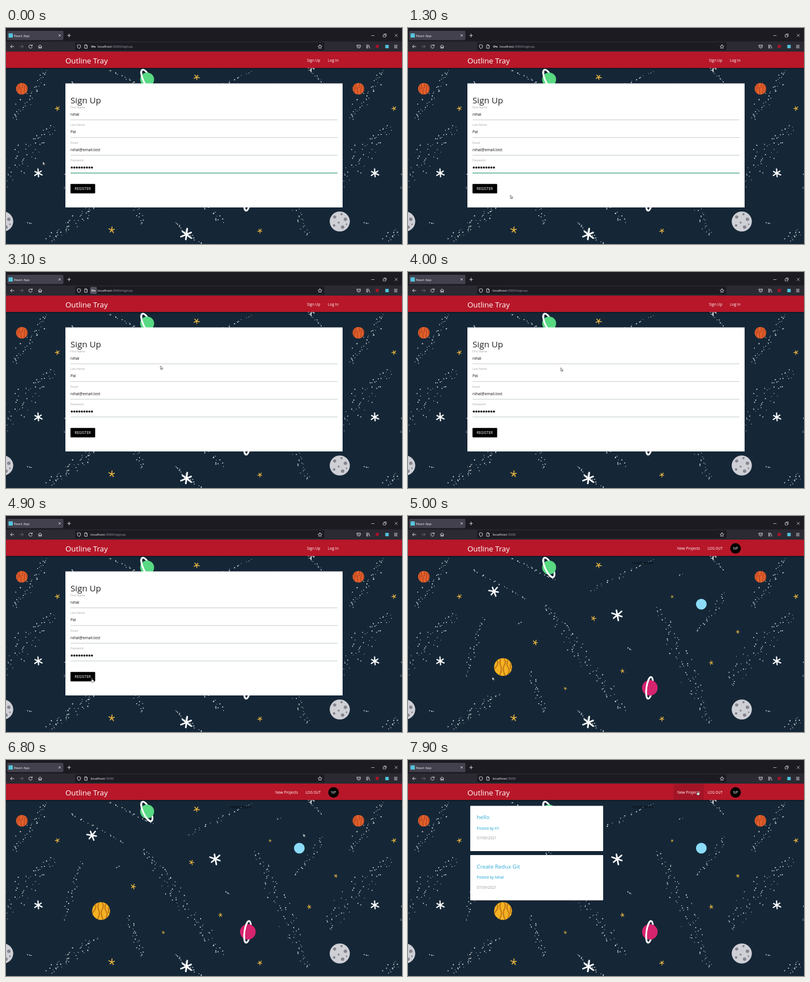
Recreate the animation shown at these times as an HTML page. Size 700 by 384 pixels, loop 8000 ms.

```html
<!DOCTYPE html>
<html lang="en">
<head>
<meta charset="utf-8">
<title>React App</title>
<style>
html, body { margin: 0; width: 100%; height: 100%; overflow: hidden; background: #152737; }
svg { display: block; width: 100vw; height: 100vh; font-family: "Open Sans", "Noto Sans", sans-serif; }
.icon { fill: none; stroke: #e4e4ea; stroke-width: .9; stroke-linecap: round; stroke-linejoin: round; }
.nav { fill: #fff; font-size: 6.65px; }
.label { fill: #a3a3a3; font-size: 5.1px; }
.value { fill: #111; font-size: 6.8px; }
.rule { stroke: #a9b6b6; stroke-width: .7; }
.title { fill: #2ba9d5; font-size: 9.75px; }
.by { fill: #14a3cf; font-size: 6.6px; }
.date { fill: #999; font-size: 6.6px; }
.url { fill: #9b9aa5; font-size: 6.07px; }
.url tspan { fill: #fbfbfe; }

.signup, .home, .cards, .hover, .key, .lit, .focus, .shift, .arrow, .hand {
  animation: 8s step-end infinite;
}
.signup { animation-name: signup; }
.home { animation-name: home; }
.cards, .hover { animation-name: late; }
.key { animation-name: key; }
.lit { animation-name: lit; }
.focus { animation-name: focus; }
.shift { animation-name: shift; }
.arrow { animation-name: arrow; }
.hand { animation-name: hand; }
.pointer { animation: move 8s ease-in-out infinite; }

@keyframes signup { 0% { opacity: 1 } 62.5%, 100% { opacity: 0 } }
@keyframes home { 0% { opacity: 0 } 62.5%, 100% { opacity: 1 } }
@keyframes late { 0% { opacity: 0 } 95%, 100% { opacity: 1 } }
@keyframes key { 0% { opacity: 1 } 50%, 100% { opacity: 0 } }
@keyframes lit { 0% { opacity: 0 } 27.5% { opacity: 1 } 50%, 100% { opacity: 0 } }
@keyframes focus { 0% { opacity: 1 } 27.5%, 100% { opacity: 0 } }
@keyframes shift { 0% { transform: translateX(12.5px) } 50%, 100% { transform: none } }
@keyframes arrow { 0% { opacity: 1 } 58.75% { opacity: 0 } 62.5% { opacity: 1 } 95%, 100% { opacity: 0 } }
@keyframes hand { 0% { opacity: 0 } 58.75% { opacity: 1 } 62.5% { opacity: 0 } 95%, 100% { opacity: 1 } }
@keyframes move {
  0% { transform: translate(65px, 237.5px) }
  16.25% { transform: translate(181px, 297px) }
  27.5% { transform: translate(155px, 34px) }
  38.75%, 48.75% { transform: translate(273px, 167px) }
  60%, 62.4% { transform: translate(152px, 288px) }
  62.5% { transform: translate(149px, 286px) }
  81.25% { transform: translate(529px, 144px) }
  95% { transform: translate(506px, 59px) }
  98.75%, 100% { transform: translate(512px, 55px) }
}
</style>
</head>
<body>
<svg viewBox="0 0 700 384" preserveAspectRatio="none">
  <defs>
    <clipPath id="rust"><circle cx="28" cy="108" r="10.5"/></clipPath>
    <clipPath id="gold"><circle cx="168" cy="268.5" r="16"/></clipPath>
    <linearGradient id="shade" x2="0" y2="1">
      <stop stop-opacity=".4"/><stop offset="1" stop-opacity="0"/>
    </linearGradient>
    <g id="sky">
      <g id="dots" fill="#fff"></g>
      <g id="stars" stroke-linecap="round"></g>
      <g clip-path="url(#rust)">
        <circle cx="28" cy="108" r="10.5" fill="#e2602c"/>
        <path d="M20 100l1 16M24 97l-1 12M26 105l1 14M30 97l-1 10M33 101l-1 16M36 100l1 12" fill="none" stroke="#a83d1c" stroke-width="1.1"/>
      </g>
      <g fill="none" stroke="#fff" stroke-width="3">
        <ellipse cx="249" cy="91.5" rx="6.5" ry="19" transform="rotate(-25 249 91.5)"/>
        <circle cx="249.500" cy="91.500" r="12.3" fill="#58d982" stroke="none"/>
        <path d="M249 72.500a6.500 19 0 0 0 0 38" transform="rotate(-25 249 91.5)"/>
        <ellipse cx="427" cy="305.5" rx="5.5" ry="19.5" transform="rotate(8 427 305.5)"/>
        <circle cx="427.5" cy="305.5" r="13.8" fill="#d6246f" stroke="none"/>
        <path d="M427 286a5.500 19.500 0 0 0 0 39" transform="rotate(8 427 305.5)"/>
      </g>
      <circle cx="518.5" cy="156.700" r="9.5" fill="#8bdcf8"/>
      <g clip-path="url(#gold)">
        <circle cx="168" cy="268.5" r="16" fill="#f4b223"/>
        <path d="M157 255q4 8-2 14t3 14M164 253q-3 8 0 14t-2 16M170 253q4 7 0 13t2 18M177 255q-4 8 0 14t-1 13M182 260q-2 6 0 13" fill="none" stroke="#c57a14" stroke-width="2.2"/>
      </g>
      <circle cx="590" cy="344" r="17.8" fill="#cfcfd6"/>
      <g fill="#85858f">
        <circle cx="581" cy="336" r="2.8"/><circle cx="593" cy="331" r="2"/>
        <circle cx="600" cy="340" r="3"/><circle cx="588" cy="346" r="1.7"/>
        <circle cx="580" cy="351" r="2.200"/><circle cx="595" cy="354" r="3"/><circle cx="602" cy="349" r="1.4"/>
      </g>
    </g>
  </defs>

  <rect width="700" height="384" fill="#152737"/>
  <use href="#sky" x="-595"/>
  <use href="#sky"/>
  <use href="#sky" x="595"/>

  <!-- browser -->
  <rect width="700" height="25" fill="#1c1b22"/>
  <rect y="24" width="700" height="18" fill="#2b2a33"/>
  <rect x="2" y="5" width="99.500" height="16.500" rx="2" fill="#42414d"/>
  <rect x="4.5" y="9.5" width="7.5" height="7.5" fill="#57c4dc"/>
  <text x="14" y="16" font-size="5.9" fill="#f4f4f8">React App</text>
  <rect x="122" y="25.500" width="441" height="14.500" rx="2" fill="#1c1b22"/>
  <g class="icon">
    <path d="M93.300 11.700l3 3m0-3l-3 3M111.500 10.500v5.500m-2.700-2.700h5.400"/>
    <path d="M646 13.5h5M667 12h4v4h-4zM668.500 12v-1.500h3.700v3.700h-1M687.500 11l4.500 4.500m0-4.500l-4.500 4.500" stroke-width=".7"/>
    <path d="M14 33H8m2.600-2.600L8 33l2.600 2.600"/>
    <path d="M24.500 33h6m-2.600-2.600l2.600 2.600-2.600 2.600" stroke="#72717b"/>
    <path d="M46 31.500a3 3 0 1 0 .2 2.500M46.300 29.700v2.100h-2.100"/>
    <path d="M57 33l3.200-3 3.200 3M58 32.500V36h1.500v-2h1.500v2h1.500v-3.500"/>
    <path d="M129 29.800l2.800 1v2q-.2 2.700-2.800 3.800-2.600-1.100-2.800-3.800v-2z"/>
    <path d="M139.500 29.900h2.700l1.300 1.400v4.800h-4zM142 30v1.500h1.400"/>
    <path d="M555 29.700l1 2.200 2.500.3-1.800 1.700.4 2.400-2.100-1.200-2.100 1.200.4-2.400-1.800-1.700 2.500-.3z" stroke-width=".8"/>
    <path d="M620.500 30.500h6v2.200a3 3 0 0 1-6 0zM622 32.300l1.500 1.400 1.500-1.400"/>
    <path d="M637.500 30v6M639.500 30v6M641.200 30.500l2 5.500"/>
    <path d="M686.500 30.800h5M686.500 33h5M686.500 35.200h5"/>
  </g>
  <rect x="653.500" y="30" width="5.500" height="5.500" fill="#a3142a"/>
  <rect x="670.500" y="30" width="6" height="6" fill="#4fc3dc"/>
  <g class="key">
    <rect class="lit" x="149" y="26.500" width="11.500" height="12.500" rx="1.500" fill="#55545f"/>
    <path class="icon" d="M154 33h3.800v1.400M156.300 33v1.200"/>
    <circle class="icon" cx="152.500" cy="33" r="1.500"/>
  </g>

  <!-- header -->
  <rect y="71" width="700" height="3" fill="url(#shade)"/>
  <rect y="42" width="700" height="29" fill="#b71729"/>
  <text x="105" y="62.700" font-size="13.3" fill="#fff">Outline Tray</text>

  <g class="signup">
    <g class="shift"><text class="url" x="149.500" y="35.300"><tspan>localhost</tspan>:3000/signup</text></g>
    <text class="nav" x="532" y="59.700">Sign Up</text>
    <text class="nav" x="569" y="59.700">Log In</text>
    <rect x="105" y="98.500" width="490" height="220.500" fill="#fff"/>
    <text x="114" y="133.700" font-size="15.200" fill="#222">Sign Up</text>
    <text class="label" x="114" y="142.500">First Name</text>
    <text class="value" x="114" y="155.800">nihal</text>
    <path class="rule" d="M114 163.200h472"/>
    <text class="label" x="114" y="174">Last Name</text>
    <text class="value" x="114" y="187.200">Pal</text>
    <path class="rule" d="M114 194.700h472"/>
    <text class="label" x="114" y="205.500">Email</text>
    <text class="value" x="114" y="218.700">nihal@email.test</text>
    <path class="rule" d="M114 226.200h472"/>
    <text class="label" x="114" y="237">Password</text>
    <path d="M116.300 248h37" stroke="#111" stroke-width="3.700" stroke-linecap="round" stroke-dasharray="0 4.450"/>
    <path class="rule" d="M114 257.700h472"/>
    <path class="focus" d="M114 257.900h472" stroke="#48a982" stroke-width="1.100"/>
    <rect x="114" y="278" width="44" height="17" rx="1" opacity=".18"/>
    <rect x="114" y="277.300" width="43.500" height="16.500" rx="1"/>
    <text x="121.300" y="288" font-size="6.450" fill="#fff">REGISTER</text>
  </g>

  <g class="home">
    <text class="url" x="149.500" y="35.300"><tspan>localhost</tspan>:3000</text>
    <rect class="hover" x="469" y="42" width="54" height="29" opacity="0" fill="#a31526"/>
    <text class="nav" x="476" y="59.700">New Projects</text>
    <text class="nav" x="529.500" y="60" style="font-size:6.200px">LOG OUT</text>
    <circle cx="579" cy="57.700" r="9.400"/>
    <text x="579" y="59.900" font-size="6.300" fill="#fff" text-anchor="middle">NP</text>
    <text x="396" y="86.200" font-size="6.500" fill="#060c12">Notifications</text>
    <g class="cards">
      <path d="M110 82h235v81H110zM110 169.500h235v81H110z" opacity=".3"/>
      <rect x="110" y="81.500" width="235" height="80.500" rx="1" fill="#fff"/>
      <text class="title" x="121.500" y="105.300">hello</text>
      <text class="by" x="121.500" y="124.200">Posted by XY</text>
      <text class="date" x="121.500" y="141.200">07/06/2021</text>
      <rect x="110" y="169" width="235" height="80.500" rx="1" fill="#fff"/>
      <text class="title" x="121.500" y="192.800">Create Redux Git</text>
      <text class="by" x="121.500" y="211.300">Posted by Nihal</text>
      <text class="date" x="121.500" y="228.500">07/09/2021</text>
    </g>
  </g>

  <g class="pointer" fill="#fff" stroke="#222" stroke-width=".6" stroke-linejoin="round">
    <path class="arrow" d="M0 0v6l1.400-1.200 1 2 .9-.4-.9-2h1.900z"/>
    <path class="hand" d="M-.6.5q.6-.9 1.200 0V3l2.200.7q.7.300.6 1.100l-.6 2.600H-.6L-2.300 4.800q.2-1 1.100-.4l.6.500z"/>
  </g>
</svg>
<script>
let seed = 11;
const rnd = () => (seed = seed * 16807 % 2147483647) / 2147483647;
const $ = id => document.getElementById(id);

const dot = (x, y, r, alpha) =>
  `<circle cx="${x.toFixed(1)}" cy="${y.toFixed(1)}" r="${r.toFixed(2)}" opacity="${alpha}"/>`;

// a band of scattered dots: start, end, half width, count
const band = ([x1, y1, x2, y2, w, n]) => {
  let out = '';
  for (let i = 0; i < n; i++) {
    const t = (i + rnd()) / n;
    const off = (rnd() + rnd() - 1) * w * (.4 + Math.sin(t * Math.PI) * .8);
    out += dot(x1 + (x2 - x1) * t + off, y1 + (y2 - y1) * t + off * .2, .5 + rnd() * .55, .9);
  }
  return out;
};

const star = (x, y, r, arms, color) => {
  let d = '';
  for (let i = 0; i < arms; i++) {
    const a = i / arms * 2 * Math.PI + x;
    const len = r * (i % 2 ? .85 : 1);
    d += `M${x} ${y}l${(Math.cos(a) * len).toFixed(1)} ${(Math.sin(a) * len).toFixed(1)}`;
  }
  return `<path d="${d}" stroke="${color}" stroke-width="${r * .25 + .3}"/>`;
};

const bands = [
  [73, 76, 14, 163, 14, 42], [80, 173, -30, 300, 26, 75], [134, 180, 102, 286, 10, 30],
  [180, 74, 262, 114, 9, 22], [113, 94, 213, 150, 7, 20], [244, 158, 380, 346, 24, 92],
  [444, 163, 534, 370, 22, 88], [434, 76, 322, 134, 8, 24], [560, 135, 513, 207, 9, 24],
  [215, 276, 241, 350, 9, 26], [160, 316, 76, 378, 18, 48], [297, 344, 345, 384, 8, 20],
  [536, 74, 558, 96, 5, 10], [193, 192, 202, 188, 1, 3], [388, 234, 396, 239, 1, 4],
  [478, 106, 487, 103, 1, 3], [38, 346, 47, 348, 1, 3]
];
let dots = bands.map(band).join('');
for (let i = 0; i < 130; i++) dots += dot(rnd() * 595, 72 + rnd() * 312, .4, .22);
$('dots').innerHTML = dots;

const white = [[152, 134, 9], [370, 176, 10], [57, 258, 7.5], [319, 367, 10.5], [540, 69, 7]];
const yellow = [
  [91, 143, 4], [337, 87.5, 5], [328, 182, 4.3], [225, 225, 4.5], [379, 275.5, 3.5], [278, 306.5, 2.6],
  [187, 359, 5.5], [449, 360.5, 4], [536, 261, 3.6], [583, 206, 3], [467, 143.5, 2.4]
];
$('stars').innerHTML =
  white.map(([x, y, r]) => star(x, y, r, 6, '#fff')).join('') +
  yellow.map(([x, y, r]) => star(x, y, r, 5, '#e9b53f')).join('');
</script>
</body>
</html>
```
